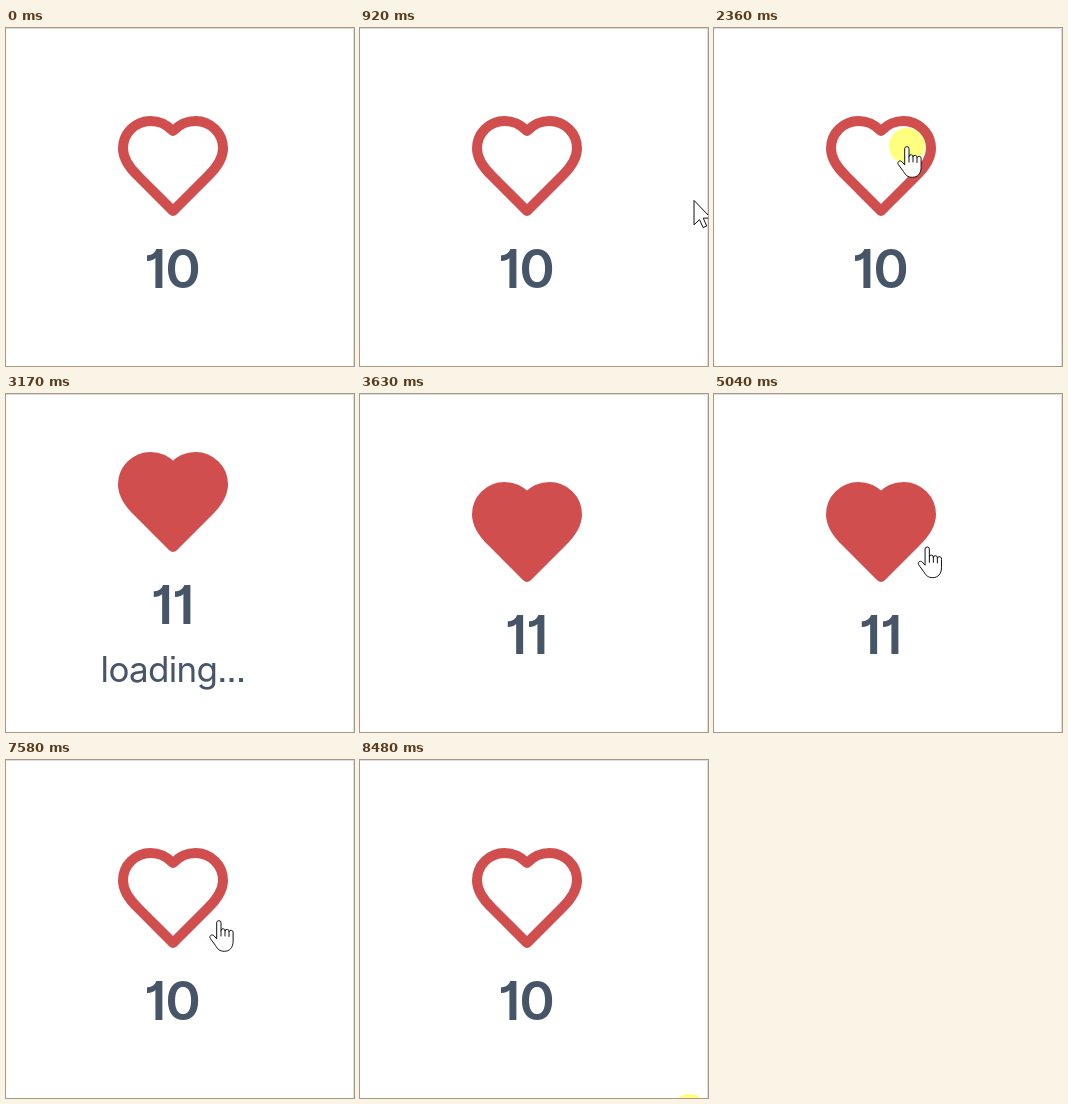
An HTML page for the animation above (8.63 s loop, 348 px wide and 338 px high).

```html
<!DOCTYPE html>
<html lang="en">
<head>
<meta charset="utf-8">
<title>Like button</title>
<style>
  html, body { margin: 0; width: 100%; height: 100%; overflow: hidden; background: #fff; }
  svg { display: block; }
  text {
    font-family: Inter, "Liberation Sans", sans-serif;
    font-optical-sizing: none;
    font-feature-settings: "cv01", "ss07";
    letter-spacing: -.02em;
    fill: #475569;
    text-anchor: middle;
  }
  #count { font-size: 54px; font-weight: 600; }
  #note { font-size: 35px; }
  #heart { stroke: #d04e4e; stroke-width: 2; stroke-linejoin: round; }
  #cursor path { fill: #fff; stroke: #111; stroke-linejoin: round; stroke-linecap: round; }
</style>
</head>
<body>
<svg width="348" height="338" viewBox="0 0 348 338">
  <path d="M0 .5H347.5V338" fill="none" stroke="#dcdcdc"/>
  <g id="widget">
    <path id="heart" transform="translate(107 78) scale(5)" d="M19 14c1.49-1.46 3-3.21 3-5.5A5.5 5.5 0 0 0 16.5 3c-1.76 0-3 .5-4.5 2-1.5-1.5-2.74-2-4.5-2A5.5 5.5 0 0 0 2 8.5c0 2.3 1.5 4.05 3 5.5l7 7Z"/>
    <text id="count" x="166" y="259.5"></text>
    <text id="note" x="167" y="318">loading...</text>
  </g>
  <circle id="click" r="18" fill="#ff0" fill-opacity=".5"/>
  <g id="cursor">
    <path id="hand" transform="translate(-10 0)" d="M7.7 18.5V2.8a2.1 2.1 0 0 1 4.3 0V10.5a2 2 0 0 1 4 .5a2 2 0 0 1 4 .8a2 2 0 0 1 4.1 1.4V21.5C24.1 27.5 20.5 31.3 15.5 31.3C10.5 31.3 8.5 29 6.5 25.5L1.2 18.3C-.2 16 2.8 13.8 4.6 15.4ZM12 10.5V16M16 11V16M20 12V16.5"/>
    <path id="arrow" d="M.7 1V25l5.5-5.2 3.6 8 3.6-1.6-3.5-7.9h7.4Z"/>
  </g>
</svg>
<script>
const LOOP = 8630;
const STEP = 69.2; // the pointer is sampled at this interval
const $ = id => document.getElementById(id);
const show = (id, on) => $(id).style.display = on ? "" : "none";
const place = (id, x, y) => $(id).setAttribute("transform", `translate(${x} ${y})`);
const within = (t, a, b) => t >= a && t < b;

const linear = u => u;
const easeOut = u => 1 - (1 - u) ** 2.5;

function move(start, end, d, ease = linear) {
  const path = document.createElementNS("http://www.w3.org/2000/svg", "path");
  path.setAttribute("d", d);
  return { start, end, path, ease, length: path.getTotalLength() };
}

const moves = [
  move(580, 1410, "M345 284C350 60 215 20 187 112"),
  move(1610, 1890, "M188 113L191 116"),
  move(2150, 2220, "M192 117L193 118"),
  move(2960, 3170, "M222 130Q280 165 390 190"),
  move(4760, 5240, "M326 176Q225 155 198 149", easeOut),
  move(7580, 8210, "M213 160Q250 230 329.5 352")
];

const clicks = [
  { start: 2360, end: 2500, x: 193, y: 118 },
  { start: 5640, end: 5840, x: 198, y: 149 },
  { start: 8480, end: LOOP, x: 329.5, y: 352 }
];

function pointer(t) {
  const m = moves.findLast(m => t >= m.start);
  if (!m) return { x: 400, y: 300 };
  const steps = Math.round((m.end - m.start) / STEP);
  const u = Math.min(1, (t - m.start) / (m.end - m.start));
  return m.path.getPointAtLength(m.length * m.ease(Math.floor(u * steps + 1e-6) / steps));
}

function draw(now) {
  const t = now % LOOP;
  const liked = within(t, 2500, 5840);
  const loading = within(t, 2500, 3630) || within(t, 5840, 6980);
  const lift = loading ? -30 : 0;
  place("widget", 0, lift);
  $("heart").setAttribute("fill", liked ? "#d04e4e" : "none");
  $("count").textContent = liked ? 11 : 10;
  show("note", loading);

  const { x, y } = pointer(t);
  const over = within(x, 107, 227) && within(y, 78 + lift, 198 + lift);
  place("cursor", x, y);
  show("hand", over);
  show("arrow", !over);

  const click = clicks.find(c => within(t, c.start, c.end));
  show("click", click);
  if (click) place("click", click.x, click.y);
}

const origin = performance.now();
function tick() {
  draw(performance.now() - origin);
  requestAnimationFrame(tick);
}
tick();
</script>
</body>
</html>
```
